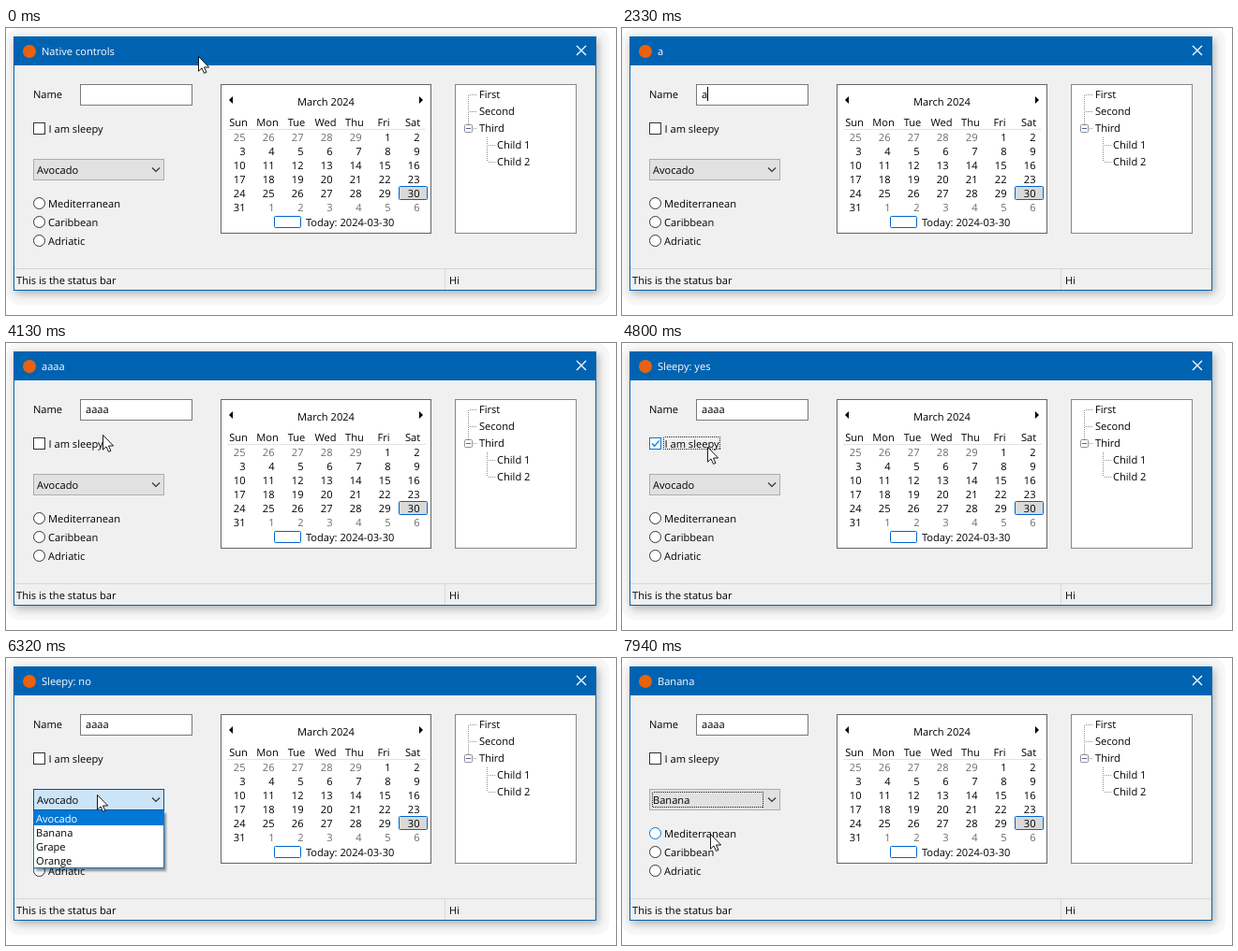
An HTML page that plays this animation: 651x307 px, repeating every 8000 ms.

```html
<!DOCTYPE html>
<html lang="en">
<head>
<meta charset="utf-8">
<title>Native controls</title>
<style>
html, body { margin: 0; width: 100%; height: 100%; overflow: hidden; background: #fff; }
svg { display: block; font: 11.1px "Open Sans", "Noto Sans", sans-serif; text-rendering: geometricPrecision; white-space: pre; }
.focus, .tree { fill: none; stroke-dasharray: 1 1; stroke-dashoffset: 1; }
.focus { stroke: #222; }
.tree { stroke: #909090; }
.mid { text-anchor: middle; }
.end { text-anchor: end; }
.crisp { shape-rendering: crispEdges; }
</style>
</head>
<body>
<svg width="651" height="307" viewBox="0 0 651 307">
  <defs>
    <filter id="blur" x="-10%" y="-10%" width="120%" height="125%"><feGaussianBlur stdDeviation="5"/></filter>
    <filter id="soft"><feGaussianBlur stdDeviation="1"/></filter>
  </defs>
  <rect width="644" height="296" rx="14" fill="#f7f7f7"/>
  <rect x="10" y="12" width="622" height="272" opacity=".3" filter="url(#blur)"/>
  <rect x="8" y="9" width="622" height="272" fill="#0063b1"/>
  <rect x="9" y="40" width="620" height="240" fill="#f0f0f0"/>

  <circle cx="25" cy="25" r="7" fill="#e8620f"/>
  <text id="title" x="38" y="29" fill="#fff"></text>
  <path d="M609 19l10 10m0-10l-10 10" stroke="#fff" stroke-width="1.3"/>

  <path class="crisp" d="M9 257.5H629M468.5 258V280" stroke="#d7d7d7"/>
  <text x="11" y="274">This is the status bar</text>
  <text x="473" y="274">Hi</text>

  <text x="29" y="74.5">Name</text>
  <rect x="79.5" y="60.5" width="119" height="22" fill="#fff" stroke="#7a7a7a"/>
  <text id="name" x="85" y="75"></text>
  <rect id="caret" y="63" width="1" height="15"/>

  <rect id="box" x="29.5" y="101.5" width="12" height="12"/>
  <path id="tick" d="M32 107.5l2.7 2.8 5-6" fill="none" stroke="#0078d7" stroke-width="1.3"/>
  <text x="45.5" y="112">I am sleepy</text>
  <rect id="boxFocus" class="focus crisp" x="44.5" y="100.5" width="60" height="13"/>

  <g id="radios"></g>

  <rect id="combo" x="29.5" y="140.5" width="139" height="22"/>
  <text id="fruit" x="33" y="156"></text>
  <path d="M156 149.5l4 4 4-4" fill="none" stroke="#333" stroke-width="1.2"/>
  <rect id="comboFocus" class="focus crisp" x="32.5" y="143.5" width="118" height="16"/>

  <rect x="229.5" y="60.5" width="224" height="159" fill="#fff" stroke="#646464"/>
  <path d="M242 73v8l-4-4zM441 73v8l4-4z"/>
  <text class="mid" x="341.5" y="82.5">March 2024</text>
  <path class="crisp" d="M236 108.5H448" stroke="#e3e3e3"/>
  <rect x="419.5" y="169.5" width="30" height="14" rx="1" fill="#d9d9d9" stroke="#0066cc"/>
  <g id="days"></g>
  <rect x="286.5" y="201.5" width="28" height="12" rx="1" fill="#fff" stroke="#0066cc"/>
  <text x="320" y="212">Today: 2024-03-30</text>

  <rect x="479.5" y="60.5" width="129" height="159" fill="#fff" stroke="#828790"/>
  <path class="tree crisp" d="M493.5 71V107M494 71.5H503M494 89.5H503M498 107.5H503M513.5 116V143M514 125.5H522M514 143.5H522"/>
  <rect x="489.5" y="103.5" width="8" height="8" rx="1" fill="#fff" stroke="#919191"/>
  <path class="crisp" d="M491 107.5H496" stroke="#4b63a7"/>
  <g id="nodes"></g>

  <g id="popup">
    <rect x="32" y="166" width="139" height="62" opacity=".4" filter="url(#soft)"/>
    <rect x="29.5" y="163.5" width="139" height="61" fill="#fff" stroke="#0078d7"/>
    <rect id="mark" x="30" width="138" height="15" fill="#0078d7"/>
    <g id="items"></g>
  </g>

  <path id="cursor" d="M.5 .5V16.2L4 12.9 6.5 18.4 8.9 17.4 6.5 12H11.6Z" fill="#fff" stroke="#000" stroke-width=".9"/>
</svg>
<script>
const $ = id => document.getElementById(id);
const clamp = (v, lo, hi) => Math.min(hi, Math.max(lo, v));

function set(el, attrs) {
  for (const key in attrs) el.setAttribute(key, attrs[key]);
}

function add(parent, tag, attrs, text = '') {
  const el = document.createElementNS('http://www.w3.org/2000/svg', tag);
  set(el, attrs);
  el.textContent = text;
  return $(parent).appendChild(el);
}

const radios = ['Mediterranean', 'Caribbean', 'Adriatic'].map((label, i) => {
  add('radios', 'text', { x: 45, y: 192 + 20 * i }, label);
  return add('radios', 'circle', { cx: 35.5, cy: 187.5 + 20 * i, r: 6, fill: '#fff', stroke: '#333' });
});

// Six weeks from 25 February 2024
['Sun', 'Mon', 'Tue', 'Wed', 'Thu', 'Fri', 'Sat'].forEach((day, i) =>
  add('days', 'text', { class: 'mid', x: 248 + 31 * i, y: 105 }, day));
for (let i = 0; i < 42; i++) {
  const date = new Date(2024, 1, 25 + i);
  add('days', 'text', {
    class: 'end', x: 255.5 + 31 * (i % 7), y: 121 + 15 * Math.floor(i / 7),
    fill: date.getMonth() === 2 ? '#000' : '#6d6d6d'
  }, date.getDate());
}

['First', 'Second', 'Third', 'Child 1', 'Child 2'].forEach((node, i) =>
  add('nodes', 'text', { x: i < 3 ? 505 : 524, y: 74.7 + 18 * i }, node));

const items = ['Avocado', 'Banana', 'Grape', 'Orange'].map((fruit, i) =>
  add('items', 'text', { x: 32, y: 176 + 15 * i }, fruit));

// The screen is sampled at a fixed rate; all times below count samples.
const SAMPLE = 136.5;
const TYPE = 17, POINT = 27, CHECK = 33, UNCHECK = 38, OPEN = 45, PICK = 54;

// Pointer glides: start, end, x, y
const glides = [
  [3, 6, 209, 37], [6, 12, 189, 109], [25, 30, 103, 98], [30, 32, 91, 111],
  [40, 42, 93, 140], [42, 44, 97, 146], [46, 51, 94, 184], [55, 57, 94, 188]
];

function pointer(n) {
  return glides.reduce(([x, y], [from, to, x2, y2]) => {
    const p = clamp((n - from) / (to - from), 0, 1);
    const ease = p * p * (3 - 2 * p);
    return [x + (x2 - x) * ease, y + (y2 - y) * ease];
  }, [205, 30]);
}

const pulse = (n, peak, period) => .5 + .5 * Math.cos(2 * Math.PI * (n - peak) / period);

function caretOpacity(n) {
  if (n < TYPE) return pulse(n, 2.5, 5);
  if (n < 25) return 1;
  return n < CHECK ? pulse(n, 28, 4) : 0;
}

function paint(id, hover, press, idle) {
  const [fill, stroke] = press ? ['#cce4f7', '#005499'] : hover ? [idle.hover, '#0078d7'] : [idle.fill, idle.stroke];
  set($(id), { fill, stroke });
}

const show = (id, on) => set($(id), { opacity: Number(on) });

function draw(n) {
  const [x, y] = pointer(n);
  const over = (left, top, right, bottom) => x > left && x < right && y > top && y < bottom;

  const typed = 'a'.repeat(clamp(1 + Math.floor((n - TYPE) / 1.6), 0, 4));
  $('name').textContent = typed;
  $('title').textContent =
    n < TYPE ? 'Native controls' :
    n <= CHECK ? typed :
    n < UNCHECK ? 'Sleepy: yes' :
    n < PICK ? 'Sleepy: no' : 'Banana';
  set($('caret'), { x: 85 + 6 * typed.length });
  show('caret', caretOpacity(n));

  paint('box', over(29, 100, 105, 115), n === CHECK || n === UNCHECK,
    { fill: '#fff', hover: '#fff', stroke: '#333' });
  show('tick', n > CHECK && n < UNCHECK);
  show('boxFocus', n > CHECK && n < OPEN);

  const open = n >= OPEN && n < PICK;
  paint('combo', over(29, 141, 169, 163), open, { fill: '#e1e1e1', hover: '#e5f1fb', stroke: '#adadad' });
  $('fruit').textContent = n < PICK ? 'Avocado' : 'Banana';
  show('comboFocus', n >= PICK);

  show('popup', open && clamp((n - OPEN + 1) / 2, 0, 1));
  const chosen = clamp(Math.floor((y - 164) / 15), 0, 3);
  set($('mark'), { y: 164 + 15 * chosen });
  items.forEach((item, i) => set(item, { fill: i === chosen ? '#fff' : '#000' }));
  set(radios[0], { stroke: over(29, 185, 122, 197) ? '#0078d7' : '#333' });

  set($('cursor'), { transform: `translate(${Math.round(x)} ${Math.round(y)})` });
  show('cursor', n < TYPE || n >= POINT);
}

const start = performance.now();
function frame() {
  draw(Math.floor((performance.now() - start) % 8000 / SAMPLE));
  requestAnimationFrame(frame);
}
frame();
</script>
</body>
</html>
```
